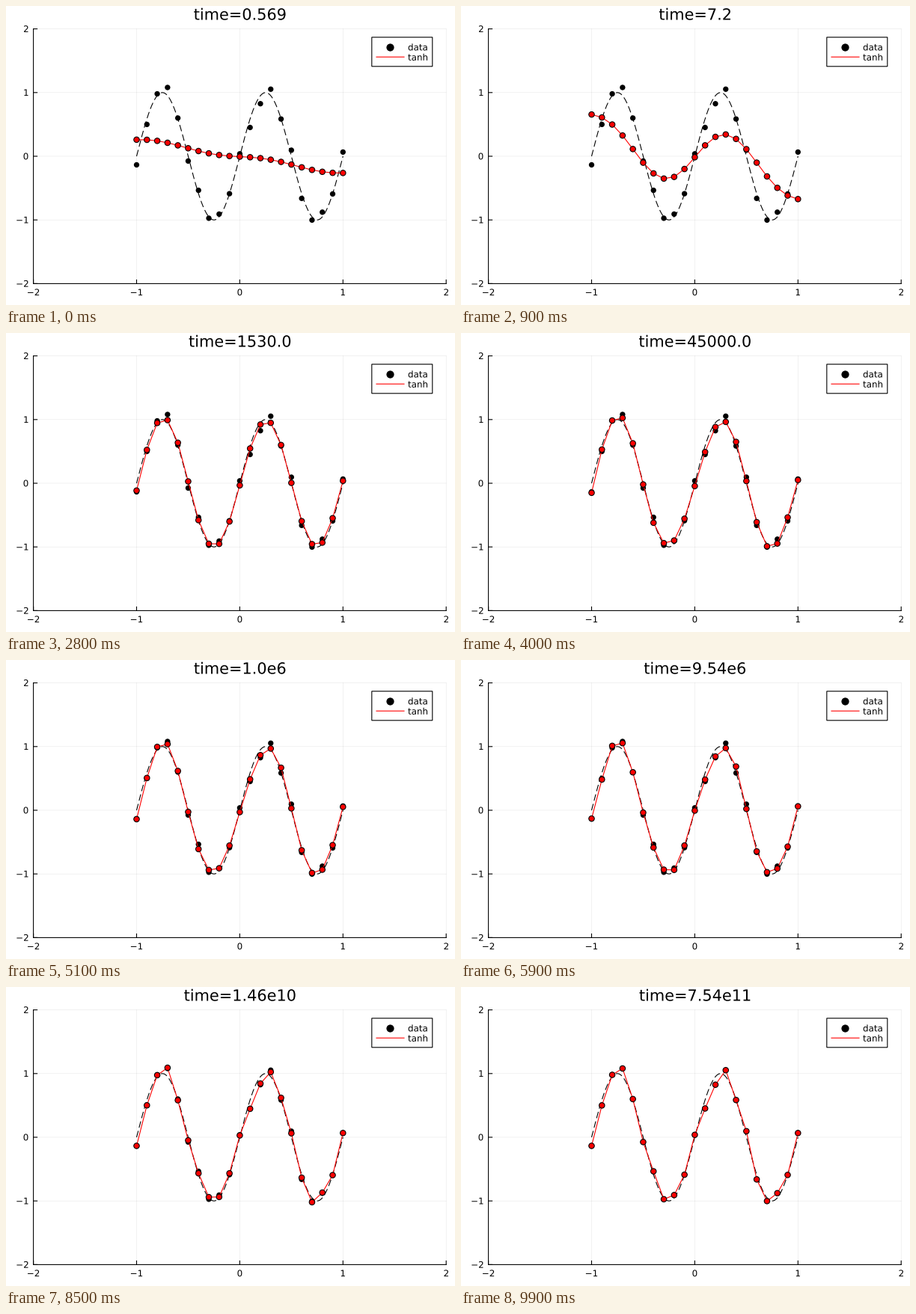
A matplotlib script that plays this animation: 600x400 px, repeating every 10000 ms.

```python
from itertools import product

import matplotlib.pyplot as plt
import numpy as np
from matplotlib.animation import FuncAnimation
from matplotlib.patches import PathPatch, Rectangle
from matplotlib.textpath import TextPath
from matplotlib.transforms import Affine2D

W, H, DPI = 600, 400, 100
FRAMES, INTERVAL = 100, 100
PT = 72 / DPI  # points per pixel
LINE = 1.1 * PT
LEFT, RIGHT, TOP, BOTTOM = 36.6, 588.2, 30.6, 371.4

plt.rcParams["font.family"] = "DejaVu Sans"


def px(v):
    return LEFT + (v + 2) / 4 * (RIGHT - LEFT)


def py(v):
    return BOTTOM - (v + 2) / 4 * (BOTTOM - TOP)


# Sine samples with measured noise (thousandths)
noise = [-135, -88, 29, 129, 12, -75, 53, -22, 43, 0, 38,
         -136, -126, 102, -3, 95, -74, -51, 73, -4, 66]
x = np.linspace(-1, 1, len(noise))
y = np.sin(2 * np.pi * x) + np.array(noise) / 1000
times = np.geomspace(0.569, 7.54e11, FRAMES)


def flow(t, width, fastest):
    """Gradient flow from zero: each smooth mode is learned at its own rate."""
    kernel = 1 / np.cosh((x[:, None] - x) / width)
    shapes = np.linalg.eigh(kernel)[1][:, ::-1]
    rates = np.geomspace(fastest, 5e-12, len(x))
    learned = -np.expm1(-np.outer(t, rates))
    return (learned * (shapes.T @ y)) @ shapes.T


# Kernel width and top rate that best pass a few points: (step, sample, value)
step, sample, value = zip(
    (0, 0, 0.164), (0, 4, 0.205), (0, 15, -0.172), (0, 20, -0.284),
    (18, 0, 0.18), (18, 3, 0.757), (18, 13, 0.805), (18, 17, -0.69), (18, 20, -0.29))


def miss(params):
    fit = flow(times[list(step)], *params)
    return ((fit[np.arange(len(step)), list(sample)] - value) ** 2).sum()


grid = product(np.linspace(0.3, 0.75, 19), np.geomspace(3, 60, 31))
fits = flow(times, *min(grid, key=miss))


def label(t):
    """Three significant digits, always with a decimal point."""
    t = float(f"{t:.3g}")
    if t < 1e6:
        return f"time={t}"
    mantissa, exponent = f"{t:.2e}".split("e")
    return f"time={float(mantissa)}e{int(exponent)}"


def text_path(s, x, y, size=11.9, align="left"):
    path = TextPath((0, 0), s, size=size)
    box = path.get_extents()
    shift = {"left": 0, "center": (box.x0 + box.x1) / 2, "right": box.x1}[align]
    return Affine2D().scale(1, -1).translate(x - shift, y).transform_path(path)


fig = plt.figure(figsize=(W / DPI, H / DPI), dpi=DPI, facecolor="white")
stage = fig.add_axes([0, 0, 1, 1])
stage.set(xlim=(0, W), ylim=(H, 0))
stage.axis("off")


def write(*args, **kwargs):
    patch = PathPatch(text_path(*args, **kwargs), fc="black", lw=0, zorder=3)
    return stage.add_patch(patch)


def line(xs, ys, color="black", lw=LINE, **kwargs):
    return stage.plot(xs, ys, color=color, lw=lw, snap=False, **kwargs)[0]


def dots(xs, ys, size, **kwargs):
    # One size per dot keeps sub-pixel positions
    return stage.scatter(xs, ys, s=np.full(len(xs), (size * PT) ** 2),
                         zorder=2, **kwargs)


# Grid, axes and tick labels
for v in range(-2, 3):
    line([px(v)] * 2, [TOP, BOTTOM], lw=0.55 * PT, alpha=0.1, zorder=1)
    line([LEFT, RIGHT], [py(v)] * 2, lw=0.55 * PT, alpha=0.1, zorder=1)
    line([px(v)] * 2, [BOTTOM, BOTTOM - 5])
    line([LEFT, LEFT + 5], [py(v)] * 2)
    name = str(v).replace("-", "\u2212")
    write(name, px(v), 387.2, align="center")
    write(name, 29.5, py(v) + 4.3, align="right")
line([LEFT, LEFT, RIGHT], [TOP, BOTTOM, BOTTOM])

# Samples, true curve and fit
dots(px(x), py(y), 7.3, color="black", lw=0)
curve = np.linspace(-1, 1, 401)
line(px(curve), py(np.sin(2 * np.pi * curve)), dashes=(8, 4), dash_capstyle="butt")
fit_line = line(px(x), py(fits[0]), color="red")
fit_dots = dots(px(x), py(fits[0]), 7.4, fc="red", ec="black", lw=LINE)

# Legend
stage.add_patch(Rectangle((488.8, 41.8), 81, 39, fc="white", ec="black",
                          lw=LINE, snap=False, zorder=2))
dots([513.4], [55], 10.2, color="black", lw=0)
line([495, 532], [68.2, 68.2], color="red")
write("data", 537, 59.4)
write("tanh", 537, 72.8)

TITLE = dict(x=(LEFT + RIGHT) / 2, y=18.5, size=20.85, align="center")
title = write(label(times[0]), **TITLE)


def draw(i):
    fit_line.set_ydata(py(fits[i]))
    fit_dots.set_offsets(np.column_stack([px(x), py(fits[i])]))
    title.set_path(text_path(label(times[i]), **TITLE))
    return fit_line, fit_dots, title


anim = FuncAnimation(fig, draw, frames=FRAMES, interval=INTERVAL,
                     repeat=True, repeat_delay=0)
plt.show()
```
